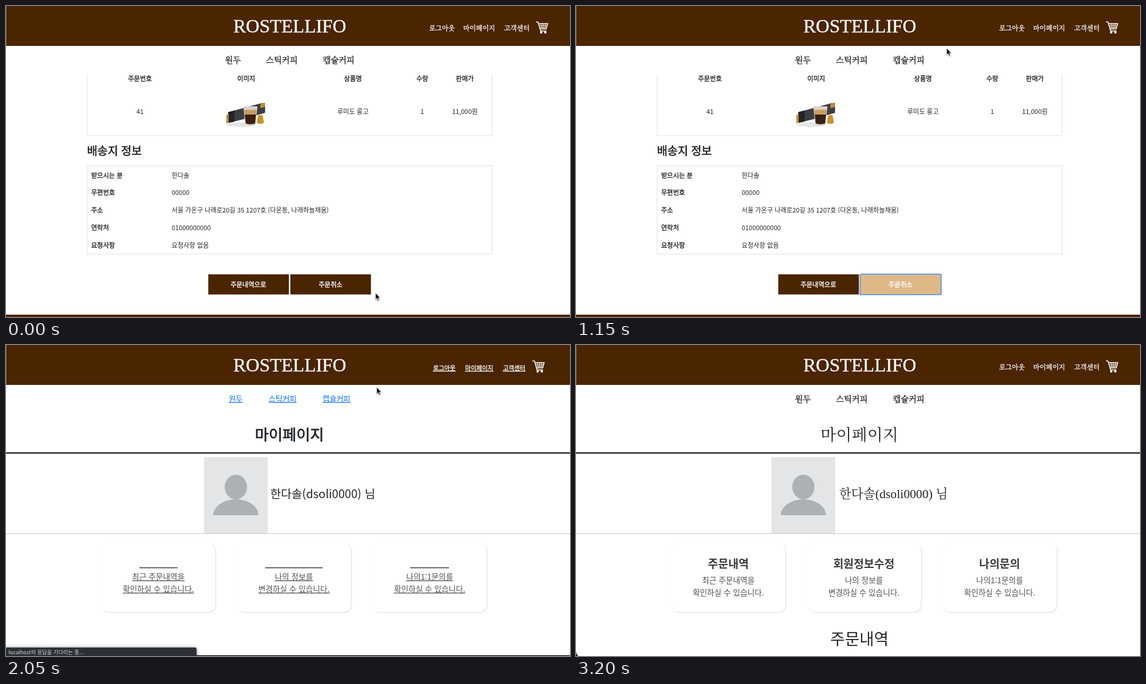
An HTML page that plays this animation: 960 px wide and 530 px high, repeating every 3.25 s.

```html
<!DOCTYPE html>
<html lang="ko">
<head>
<meta charset="utf-8">
<style>
html, body { margin: 0; width: 100%; height: 100%; overflow: hidden; background: #fff; }
#stage { position: relative; width: 100%; height: 100%; overflow: hidden; contain: strict; }
svg { position: absolute; left: 0; top: 0; width: 960px; height: 530px; overflow: hidden; }
text { font-family: "Noto Sans CJK KR", "Noto Sans CJK", "Noto Sans", sans-serif; color: #212529; fill: currentColor; white-space: pre; }
.serif text, text.serif { font-family: "Liberation Serif", "Noto Serif CJK KR", "Noto Serif", serif; }
.mid { text-anchor: middle; }
.bold text, text.bold { stroke: currentColor; stroke-width: .03em; }
.white text, text.white { color: #fff; }
.link { text-decoration: underline; }
.blue text { color: #0d6efd; }
.gray text { color: #505050; }
.card { fill: #fff; filter: drop-shadow(1.5px 1.5px 1px #ddd); }
#dialog { height: 112px; transform-origin: 488.5px 95.5px; }
#dialog .panel { fill: #292a2e; filter: drop-shadow(0 2px 5px rgba(0,0,0,.4)); }
#dialog text { font-family: Inter, "Noto Sans CJK KR", "Noto Sans CJK", sans-serif; }
</style>
</head>
<body>
<div id="stage">
<svg id="page"></svg>
<svg id="dialog"></svg>
<svg><path id="cursor" d="M0 0V11.2L2.5 8.9 4.2 13 6.1 12.2 4.4 8.2H7.8Z" fill="#000" stroke="#fff" stroke-width=".8" style="filter:drop-shadow(0 1px 1px rgba(0,0,0,.4))"/></svg>
</div>
<script>
const $ = id => document.getElementById(id);
const BROWN = [75, 36, 0], TAN = [222, 184, 135];
const rgb = c => `rgb(${c.map(Math.round)})`;

const text = (x, y, size, str, cls = '', more = '') =>
  `<text x="${x}" y="${y}" font-size="${size}" class="${cls}" ${more}>${str}</text>`;
const rect = (x, y, w, h, fill, more = '') =>
  `<rect x="${x}" y="${y}" width="${w}" height="${h}" fill="${fill}" ${more}/>`;
const group = (id, cls, ...parts) => `<g id="${id}" class="${cls}">${parts.join('')}</g>`;
const row = (xs, y, size, strs, cls = '', more = '') =>
  strs.map((s, i) => text(xs[i], y, size, s, 'mid ' + cls, more)).join('');

const USER = '한다솔', LOGIN = `${USER}(dsoli0000) 님`;
const ACCOUNT = ['로그아웃', '마이페이지', '고객센터'];
const MENU = ['원두', '스틱커피', '캡슐커피'];
const CARD_X = [163, 394, 625], CARD_MID = [259.3, 490.1, 721.1];
const CARD_LINES = [['최근 주문내역을', '나의 정보를', '나의1:1문의를'],
  ['확인하실 수 있습니다.', '변경하실 수 있습니다.', '확인하실 수 있습니다.']];

const cart = x => `<g transform="translate(${x} 26)" fill="none" stroke="#fff" stroke-width="1.5">
  <path d="M0 1.2H3.5L8 16.5H18M4.3 4H20L17.5 13H7"/>
  <path d="M5 7H19M6 10H18M8.5 4L10 13M12.3 4V13M16.2 4L14.8 13" stroke-width="1"/>
  <circle cx="9" cy="19" r="1.3" fill="#fff"/><circle cx="16" cy="19" r="1.3" fill="#fff"/></g>`;

const product = `<ellipse cx="400" cy="202" rx="25" ry="4" fill="#e6e6e6"/>
  <path d="M378 181L433 166 441 165 441 182 404 193 379 199Z" fill="#3d3e43"/>
  <path d="M378 181L389 178V197L379 199Z" fill="#222327"/>
  <path d="M433 167L441 165V172L433 174ZM375 186L379 184V199L375 200Z" fill="#c58d33"/>
  <path d="M404 171H428L425 202Q415 206 407 202Z" fill="#d9d4cd"/>
  <path d="M406 181H426L424 200Q415 203 408 200Z" fill="#3a2012"/>
  <path d="M405.5 177H426.5L426 185H406Z" fill="#c99a62"/>
  <path d="M429 187Q434 184 437 187L439 199Q433 203 427 199Z" fill="#c9922f"/>`;

const avatar = x => rect(x - 54.3, 191, 108.6, 130, '#e4e5e7') +
  `<g fill="#acb1b5"><ellipse cx="${x}" cy="242" rx="19" ry="21"/>
  <path d="M${x - 38.5} 290A38.5 27 0 0 1 ${x + 38.5} 290Z"/></g>`;

const rules = rect(0, 183, 960, 2, '#0c0c0c') + rect(0, 321, 960, 1, '#c8c8c8');
const cards = CARD_X.map(x => rect(x, 337, 193, 118, '#fff', 'rx="12" class="card"')).join('');
const cardText = (y, cls) => CARD_LINES.map((l, i) => row(CARD_MID, y + 21 * i, 13.3, l, cls)).join('');

const details = [['받으시는 분', USER], ['우편번호', '00000'],
  ['주소', '서울 가온구 나래로20길 35 1207호 (다온동, 나래하늘채움)'],
  ['연락처', '01000000000'], ['요청사항', '요청사항 없음']]
  .map(([k, v], i) => text(145, 292.5 + 29.8 * i, 11, k, 'bold') + text(282, 292.5 + 29.8 * i, 10.9, v)).join('');

const COLS = [228, 409, 590.5, 708.5, 781];

$('page').innerHTML =
  rect(0, 0, 960, 68, rgb(BROWN)) + rect(0, 0, 1, 67, '#7d6048') +
  text(483, 44.5, 32, 'ROSTELLIFO', 'mid serif white', 'stroke="#fff" stroke-width=".4"') +
  group('nav', 'serif bold',
    group('', 'white', row([742, 805.5, 869.5], 42, 11.3, ACCOUNT)),
    row([386.3, 469.5, 566.3], 96.5, 14, MENU), cart(902)) +
  group('order', '',
    '<path d="M138 116V221H827.5V116M138 272.5H827.5V422.5H138Z" fill="none" stroke="#dee2e6"/>',
    row(COLS, 128, 11, ['주문번호', '이미지', '상품명', '수량', '판매가'], 'bold'),
    row(COLS, 184, 11, ['41', '', '루미도 룽고', '1', '11,000원']),
    product, text(138, 254, 19.1, '배송지 정보', 'bold'), details,
    rect(344.3, 457.3, 137.2, 34.3, rgb(BROWN)),
    rect(484, 457.3, 137.2, 34.3, '#000', 'id="cancel"'),
    rect(483.6, 456.9, 138, 35, 'none', 'id="focus" rx="2" stroke="#5c98e6" stroke-width="1.8"'),
    row([412.5, 552.5], 479, 11, ['주문내역으로', '주문취소'], 'bold white'),
    rect(0, 526, 960, 4, rgb(BROWN))) +
  group('loading', '',
    group('', 'white', row([746, 805.5, 865], 43, 10.4, ACCOUNT, 'link bold')),
    group('', 'blue', row([391, 470.7, 562.5], 96, 12.9, MENU, 'link')),
    cart(896), text(482.5, 162, 25.5, '마이페이지', 'mid bold'),
    rules, avatar(391.3), text(450, 261, 19.6, LOGIN), cards,
    rect(227, 378.8, 65, 1.6, '#444') + rect(441, 378.8, 98, 1.6, '#444') + rect(688, 378.8, 66, 1.6, '#444'),
    group('', 'gray', cardText(400, 'link')),
    rect(0, 528.7, 960, 1.3, '#111')) +
  group('loaded', '',
    text(482.5, 163, 27.4, '마이페이지', 'mid serif'), rules, avatar(387),
    text(448, 261, 21.2, LOGIN, 'serif'), cards,
    row(CARD_MID, 380, 18.9, ['주문내역', '회원정보수정', '나의문의'], '', 'font-weight="700" style="color:#3c3c3c"'),
    group('', 'gray', cardText(406, '')),
    text(482.5, 511, 27, '주문내역', 'mid', 'font-weight="300"'),
    '<path d="M0 522Q.5 528 4 530H0Z"/>') +
  group('status', '',
    '<path d="M-9 515.5H321Q324.5 515.5 324.5 519V540H-9Z" fill="#2d2f36" style="filter:drop-shadow(0 0 3px rgba(0,0,0,.35))"/>',
    text(4, 526.7, 9, 'localhost의 응답을 기다리는 중...', '', 'style="color:#d5d7db"'));

$('dialog').innerHTML =
  rect(317.5, -8, 342, 103.5, '', 'rx="4" class="panel"') +
  text(330, 20, 12, 'localhost:9090 내용:', '', 'style="color:#f1f3f4"') +
  text(330, 42, 9.4, '', '', 'id="message" style="color:#f1f3f4"') +
  group('dismiss', '', rect(543.5, 58.5, 48.5, 24, 'none', 'rx="3" stroke="#34363b"'),
    text(567.3, 73.6, 8.6, '취소', 'mid bold', 'style="color:#8ab4f8"')) +
  rect(598, 58.3, 49, 24.7, '#8ab4f8', 'rx="3"') +
  text(622, 73.6, 8.6, '확인', 'mid bold');

const ramp = (t, a, b) => Math.min(1, Math.max(0, (t - a) / (b - a)));
const ease = k => k * k * (3 - 2 * k);
const show = (id, on) => $(id).style.display = on ? '' : 'none';

const PATH = [[250, 629, 489], [450, 606, 478], [650, 606, 478], [900, 637, 97], [1050, 631, 72], [2850, 631, 72], [2900, 653, 39]];
function cursorAt(t) {
  let [, x, y] = PATH[0];
  for (let i = 1; i < PATH.length; i++) {
    const [a] = PATH[i - 1], [b, px, py] = PATH[i], k = ease(ramp(t, a, b));
    x += (px - x) * k;
    y += (py - y) * k;
  }
  return [x, y];
}

// 0 = fully open, 1 = gone
function dialogTilt(t) {
  if (t < 1150) return Math.max(1 - ramp(t, 475, 650), ramp(t, 1075, 1150));
  return Math.max(1 - ramp(t, 1150, 1300), ramp(t, 1575, 1660));
}

function draw(now) {
  const t = Math.floor(now % 3250 / 50) * 50;
  show('order', t < 2050);
  show('loading', t >= 2050 && t < 2500);
  show('loaded', t >= 2500);
  show('nav', t < 2050 || t >= 2500);
  show('status', t >= 2050 && t < 2650);
  show('cursor', t < 2950);

  const warm = ramp(t, 250, 450) - ramp(t, 1700, 1900);
  $('cancel').setAttribute('fill', rgb(BROWN.map((c, i) => c + (TAN[i] - c) * warm)));
  show('focus', t >= 450 && t < 1650);

  const tilt = dialogTilt(t);
  show('dialog', tilt < 1);
  $('dialog').style.opacity = 1 - tilt;
  $('dialog').style.transform = tilt ? `translateY(${-14.8 * tilt}px) perspective(300px) rotateX(${13 * tilt}deg)` : 'none';
  $('message').textContent = t < 1150 ? '주문을 취소하시겠습니까?' : '주문이 취소되었습니다.';
  show('dismiss', t < 1150);

  $('cursor').setAttribute('transform', `translate(${cursorAt(t)})`);
  requestAnimationFrame(draw);
}
draw(0);
</script>
</body>
</html>
```
